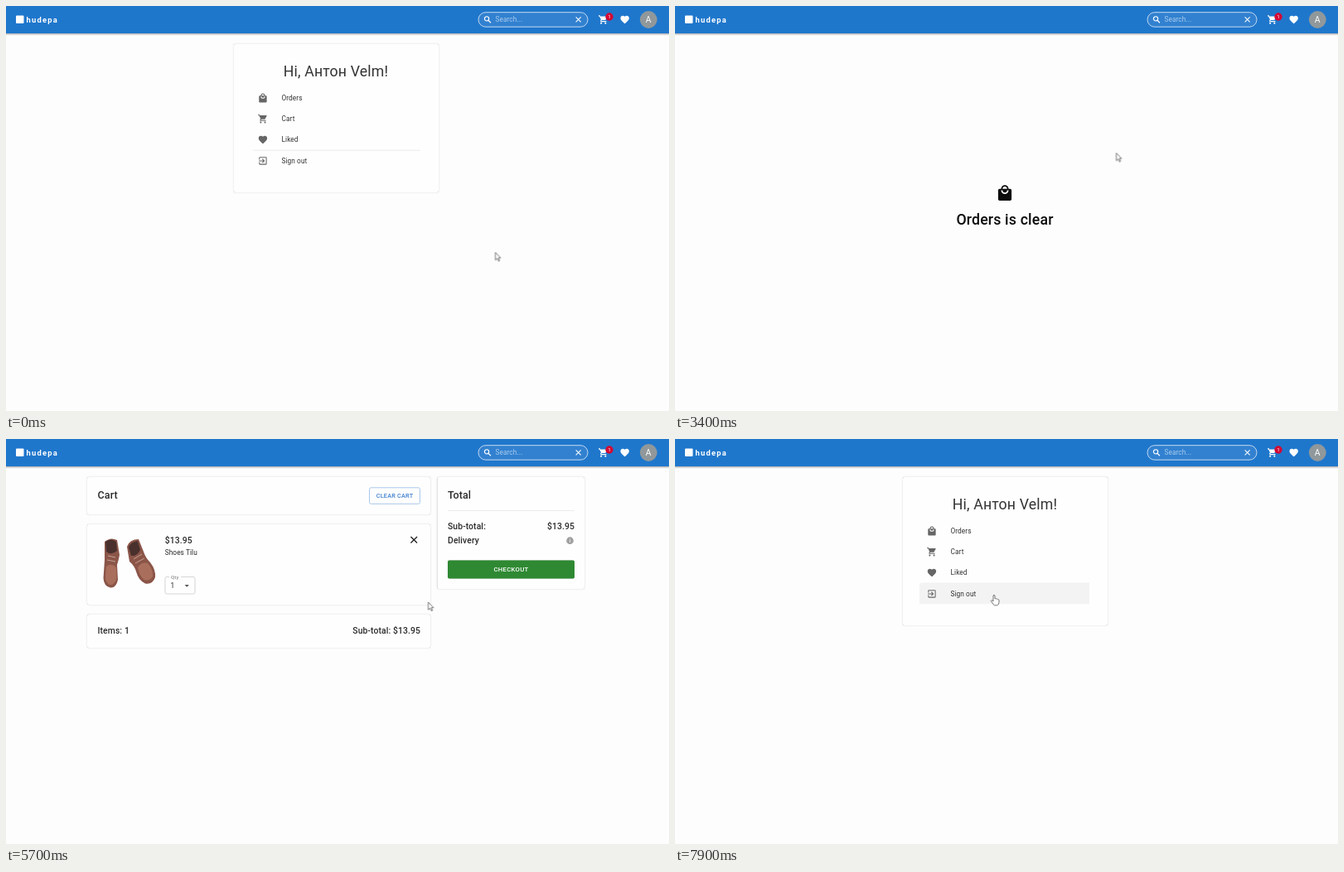
An HTML page that plays this animation: 800 by 489 pixels, repeating every 8 s.

```html
<!DOCTYPE html>
<html lang="en">
<head>
<meta charset="utf-8">
<title>Shop account</title>
<style>
html, body { margin: 0; width: 100%; height: 100%; overflow: hidden; background: #fdfdfd; }
svg { display: block; }
#stage { width: 800px; height: 489px; font: 8.3px Roboto, sans-serif; fill: #333; }
text { letter-spacing: .009em; }
.mid { text-anchor: middle; }
.end { text-anchor: end; }
.h4 { font-size: 17.7px; }
.h5 { font-size: 12.5px; font-weight: 500; }
.h6 { font-size: 10.4px; font-weight: 500; }
.btn { font-size: 7.3px; font-weight: 500; letter-spacing: .0286em; }
.card { fill: #fefefe; filter: drop-shadow(0 .8px .5px rgba(0,0,0,.3)) drop-shadow(0 .4px 1px rgba(0,0,0,.14)); }
.bar { fill: #1f77cc; filter: drop-shadow(0 1px 1.3px rgba(0,0,0,.4)); }
.line { stroke: #ececec; }
.icons { fill: #666; }

/* Loop: 8 s, 100 ms = 1.25 % */
.scene, .hover, .arrow, .hand, .before, .after, .cursor { animation: 8s step-end infinite; }
.profile { animation-name: profile; }
.orders { animation-name: orders; }
.cart { animation-name: cart; }
.liked { animation-name: liked; }
.hover { fill: #f3f3f3; animation-name: hover; }
.arrow { animation-name: arrow; }
.hand { animation-name: hand; }
.before { animation-name: before; }
.after { animation-name: after; }
.cursor { animation-name: move; fill: #fff; stroke: #555; stroke-width: .8; stroke-linejoin: round; }

@keyframes profile {
  0%, 45%, 73.75%, 92.5% { opacity: 1 }
  35%, 57.5%, 82.5% { opacity: 0 }
  100% { opacity: 1 }
}
@keyframes orders { 0%, 45%, 100% { opacity: 0 } 35% { opacity: 1 } }
@keyframes cart { 0%, 73.75%, 100% { opacity: 0 } 57.5% { opacity: 1 } }
@keyframes liked { 0%, 92.5%, 100% { opacity: 0 } 82.5% { opacity: 1 } }
@keyframes before { 0% { opacity: 1 } 61.25%, 100% { opacity: 0 } }
@keyframes after { 0% { opacity: 0 } 61.25%, 100% { opacity: 1 } }
@keyframes hover {
  0%, 35%, 57.5%, 82.5% { opacity: 0; transform: none }
  23.75%, 47.5%, 77.5% { opacity: 1; transform: translateY(50px) }
  25%, 48.75% { opacity: 1; transform: translateY(25px) }
  26.25% { opacity: 1; transform: none }
  75%, 96.25%, 100% { opacity: 1; transform: translateY(75.5px) }
}
@keyframes hand {
  0%, 35%, 57.5%, 82.5% { opacity: 0 }
  23.75%, 47.5%, 75%, 96.25%, 100% { opacity: 1 }
}
@keyframes arrow {
  0%, 35%, 57.5%, 82.5% { opacity: 1 }
  23.75%, 47.5%, 75%, 96.25%, 100% { opacity: 0 }
}
@keyframes move {
  0% { transform: translate(590.5px, 297.5px) }
  11.25% { transform: translate(590.5px, 297.5px); animation-timing-function: steps(5) }
  17.5% { transform: translate(588.5px, 297.5px); animation-timing-function: steps(4) }
  22.5% { transform: translate(500px, 186px); animation-timing-function: steps(3) }
  26.25% { transform: translate(400px, 108px) }
  35% { transform: translate(400px, 108px); animation-timing-function: steps(4) }
  40% { transform: translate(530px, 174px); animation-timing-function: steps(2) }
  42.5% { transform: translate(532.5px, 177.5px) }
  45% { transform: translate(532.5px, 177.5px); animation-timing-function: steps(4) }
  50% { transform: translate(411px, 130px); animation-timing-function: steps(2) }
  52.5% { transform: translate(406.5px, 128px) }
  61.25% { transform: translate(406.5px, 128px); animation-timing-function: steps(7) }
  70% { transform: translate(509.5px, 197px) }
  73.75% { transform: translate(509.5px, 197px); animation-timing-function: steps(4) }
  78.75% { transform: translate(400px, 158px) }
  83.75% { transform: translate(400px, 158px); animation-timing-function: steps(5) }
  90% { transform: translate(462px, 231px) }
  92.5% { transform: translate(462px, 231px); animation-timing-function: steps(4) }
  97.5%, 100% { transform: translate(385px, 188px) }
}
</style>
</head>
<body>
<svg id="stage" viewBox="0 0 800 489">
  <defs>
    <symbol id="basket" viewBox="0 0 24 24"><path d="M7 18c-1.1 0-2 .9-2 2s.9 2 2 2 2-.9 2-2-.9-2-2-2zM1 2v2h2l3.6 7.6-1.35 2.45C4.5 15.4 5.5 17 7 17h12v-2H7.4c-.15 0-.25-.2-.2-.35L8.1 13h7.45c.75 0 1.4-.4 1.75-1L20.9 5.5C21.3 4.8 20.8 4 20 4H5.2l-.95-2zM17 18c-1.1 0-2 .9-2 2s.9 2 2 2 2-.9 2-2-.9-2-2-2z"/></symbol>
    <symbol id="bag" viewBox="0 0 24 24"><path d="M19 6h-2a5 5 0 0 0-10 0H5a2 2 0 0 0-2 2v12a2 2 0 0 0 2 2h14a2 2 0 0 0 2-2V8a2 2 0 0 0-2-2zm-7-3a3 3 0 0 1 3 3H9a3 3 0 0 1 3-3zm0 10a5 5 0 0 1-5-5h2a3 3 0 0 0 6 0h2a5 5 0 0 1-5 5z"/></symbol>
    <symbol id="heart" viewBox="0 0 24 24"><path d="M12 21.35l-1.45-1.32C5.4 15.36 2 12.28 2 8.5 2 5.42 4.42 3 7.5 3c1.74 0 3.41.81 4.5 2.09C13.09 3.81 14.76 3 16.5 3 19.58 3 22 5.42 22 8.5c0 3.78-3.4 6.86-8.55 11.54z"/></symbol>
    <symbol id="exit" viewBox="0 0 24 24"><path d="M10.1 15.6L11.5 17l5-5-5-5-1.4 1.4 2.6 2.6H3v2h9.7zM19 3H5a2 2 0 0 0-2 2v4h2V5h14v14H5v-4H3v4a2 2 0 0 0 2 2h14a2 2 0 0 0 2-2V5a2 2 0 0 0-2-2z"/></symbol>
    <symbol id="lens" viewBox="0 0 24 24"><path d="M14 14l5.7 5.7M15 9.5a5.5 5.5 0 1 1-11 0a5.5 5.5 0 0 1 11 0z" fill="none" stroke="#fff" stroke-width="2.4"/></symbol>
    <symbol id="close" viewBox="0 0 24 24"><path d="M5.7 5.7L18.3 18.3M18.3 5.7L5.7 18.3" fill="none" stroke="currentColor" stroke-width="2.2"/></symbol>
    <symbol id="info" viewBox="0 0 24 24"><path d="M12 2a10 10 0 1 0 0 20a10 10 0 0 0 0-20zm1 15h-2v-6h2zm0-8h-2V7h2z"/></symbol>
    <symbol id="bin" viewBox="0 0 24 24"><path d="M6 19a2 2 0 0 0 2 2h8a2 2 0 0 0 2-2V7H6zM19 4h-3.5l-1-1h-5l-1 1H5v2h14z"/></symbol>
  </defs>

  <rect width="800" height="489" fill="#fdfdfd"/>

  <g class="scene profile">
    <rect class="card" x="275" y="46" width="247" height="179" rx="2"/>
    <text class="h4 mid" x="398" y="84.5">Hi, Антон Velm!</text>
    <path class="line" d="M298 174.3H500"/>
    <rect class="hover" x="295" y="98.5" width="205" height="25.3"/>
    <g class="icons">
      <use href="#bag" x="303.7" y="105" width="12.5" height="12.5"/>
      <use href="#basket" x="303.7" y="130" width="12.5" height="12.5"/>
      <use href="#heart" x="303.7" y="155.2" width="12.5" height="12.5"/>
      <use href="#exit" x="303.7" y="180.7" width="12.5" height="12.5"/>
    </g>
    <text x="332.5" y="114.3">Orders</text>
    <text x="332.5" y="139.3">Cart</text>
    <text x="332.5" y="164.3">Liked</text>
    <text x="332.5" y="190">Sign out</text>
  </g>

  <g class="scene orders" fill="#0c0c0c">
    <use href="#bag" x="387.2" y="215.3" width="21.6" height="21.6"/>
    <text class="h4 mid" x="398" y="264" font-weight="500">Orders is clear</text>
  </g>

  <g class="scene cart" fill="#2b2b2b">
    <rect class="card" x="98" y="46" width="414" height="45" rx="2"/>
    <rect class="card" x="98" y="103" width="414" height="97" rx="2"/>
    <rect class="card" x="98" y="212" width="414" height="40" rx="2"/>
    <rect class="card" x="520.5" y="46" width="177.5" height="135" rx="2"/>

    <text class="h5" x="110.5" y="72">Cart</text>
    <rect x="438.5" y="58.8" width="61" height="19.5" rx="2" fill="none" stroke="#a9c8ea"/>
    <text class="btn mid" x="469" y="71.2" fill="#3d7fd0">CLEAR CART</text>

    <rect class="before" x="110.5" y="114" width="72.5" height="73" fill="#dfdfdf"/>
    <g class="after">
      <rect x="110.5" y="114" width="72.5" height="73" fill="#fefefe"/>
      <path d="M119 124Q126 118 134 122L137 140Q136 146 134 152L135 170Q133 180 126 179.500Q118 178 117.500 168L119 146Z" fill="#8b5548"/>
      <path d="M121 154Q127 149 133 155L133.500 169Q130 177 125 176Q119.500 173 120 165Z" fill="#a96f5c"/>
      <path d="M120 124Q127 119 133 124L134 135Q127 141 121 136Z" fill="#49302d"/>
      <path d="M146 130Q149 121 160 121L166 136Q168 143 174 149Q181 158 180 167Q177 176 168 174.500Q160 171 157 160Q155 153 149 148Z" fill="#8b5548"/>
      <path d="M159 155Q164 148 171 150Q178 158 177 166Q173 172 167 170Q161 166 159 155Z" fill="#a96f5c"/>
      <path d="M148 131Q150 124 159 123L162 134Q158 142 151 141Z" fill="#49302d"/>
      <path d="M123 141L132 143M122 146L132 148M154 145L164 139M156 150L167 144" stroke="#d3b5a8" stroke-width=".8"/>
    </g>
    <text class="h6" x="191.700" y="126">$13.95</text>
    <text x="191.700" y="139.600">Shoes Tilu</text>
    <path d="M197 166.500H194a2 2 0 0 0-2 2V185a2 2 0 0 0 2 2H226a2 2 0 0 0 2-2V168.500a2 2 0 0 0-2-2H211" fill="none" stroke="#cbcbcb" stroke-width=".8"/>
    <text x="199" y="168.500" font-size="6.2" fill="#777">Qty</text>
    <text x="198.500" y="179.500">1</text>
    <path d="M215.600 176h5.200l-2.600 2.700z" fill="#555"/>
    <use href="#close" x="485" y="114.500" width="14.500" height="14.500" color="#222"/>

    <text class="h6" x="110.5" y="234.700">Items: 1</text>
    <g class="before">
      <text class="h6 end" x="500" y="234.700">Sub-total: $0</text>
      <text class="h6 end" x="686" y="109.300">$0</text>
    </g>
    <g class="after">
      <text class="h6 end" x="500" y="234.700">Sub-total: $13.95</text>
      <text class="h6 end" x="686" y="109.300">$13.95</text>
    </g>

    <text class="h5" x="533" y="72">Total</text>
    <path class="line" d="M533 86.500H686"/>
    <text class="h6" x="533" y="109.300">Sub-total:</text>
    <text class="h6" x="533" y="126.200">Delivery</text>
    <use href="#info" x="675.300" y="117.500" width="10.400" height="10.400" fill="#a0a0a0"/>
    <rect x="533" y="146.500" width="153" height="22" rx="2" fill="#2e8932" style="filter:drop-shadow(0 .8px .7px rgba(0,0,0,.3))"/>
    <text class="btn mid" x="609.500" y="160.200" fill="#fff" style="font-size:7.8px">CHECKOUT</text>
  </g>

  <g class="scene liked" fill="#222">
    <text class="h4 mid" x="398" y="63.500" font-weight="700" fill="#111">Liked</text>
    <rect x="98" y="83.500" width="143.300" height="156.500" rx="2" fill="#dbdbdb"/>
    <circle cx="223.500" cy="101.300" r="10" fill="#fff"/>
    <use href="#bin" x="215.500" y="93.200" width="16" height="16" fill="#777"/>
    <text x="97.700" y="254.200">Red pomade</text>
    <text x="97.700" y="267" font-weight="700">$1.25</text>
    <rect x="98.500" y="286.500" width="142.500" height="19.500" fill="none" stroke="#74b078"/>
    <text class="btn mid" x="169.500" y="298.700">MOVE TO CART</text>
  </g>

  <rect class="bar" x="-4" y="-4" width="808" height="37"/>
  <g fill="#fff">
    <rect x="12" y="11.500" width="9.500" height="9.500" rx="1"/>
    <text x="24.500" y="19.800" font-size="9.400" font-weight="700" style="letter-spacing:1.2px">hudepa</text>
    <rect x="570" y="7.700" width="132" height="17.500" rx="8.750" fill="#3281d0" stroke="#c5dbf1"/>
    <use href="#lens" x="575.500" y="10.800" width="11.500" height="11.500"/>
    <text x="590.500" y="19.300" fill="#a9cbed">Search...</text>
    <use href="#close" x="684.900" y="10.700" width="11.500" height="11.500" color="#fff"/>
    <use href="#basket" x="714.500" y="10.300" width="12.500" height="12.500"/>
    <circle cx="728" cy="13" r="4.700" fill="#d20a35"/>
    <text class="mid" x="728" y="15.200" font-size="6.200">1</text>
    <use href="#heart" x="740.400" y="10.200" width="12.500" height="12.500"/>
    <circle cx="775.300" cy="16.500" r="10.400" fill="#90989b"/>
    <text class="mid" x="775.300" y="20.200" font-size="10.400">А</text>
  </g>

  <g class="cursor">
    <path class="arrow" d="M0 0V9.300L2.200 7.300 3.800 10.600 5.200 10 3.700 6.700H6.400Z"/>
    <path class="hand" d="M-1 7V1Q0 -.8 1 1V4.800Q2 4 2.800 5.200Q3.800 4.500 4.500 5.700Q5.800 5.300 6 6.700V9.300Q5.600 12.500 3.600 12.800H.5Q-1 12-2 10L-3.800 7.500Q-3.200 5.800-1.800 7.200L-1 8Z"/>
  </g>
</svg>
</body>
</html>
```
